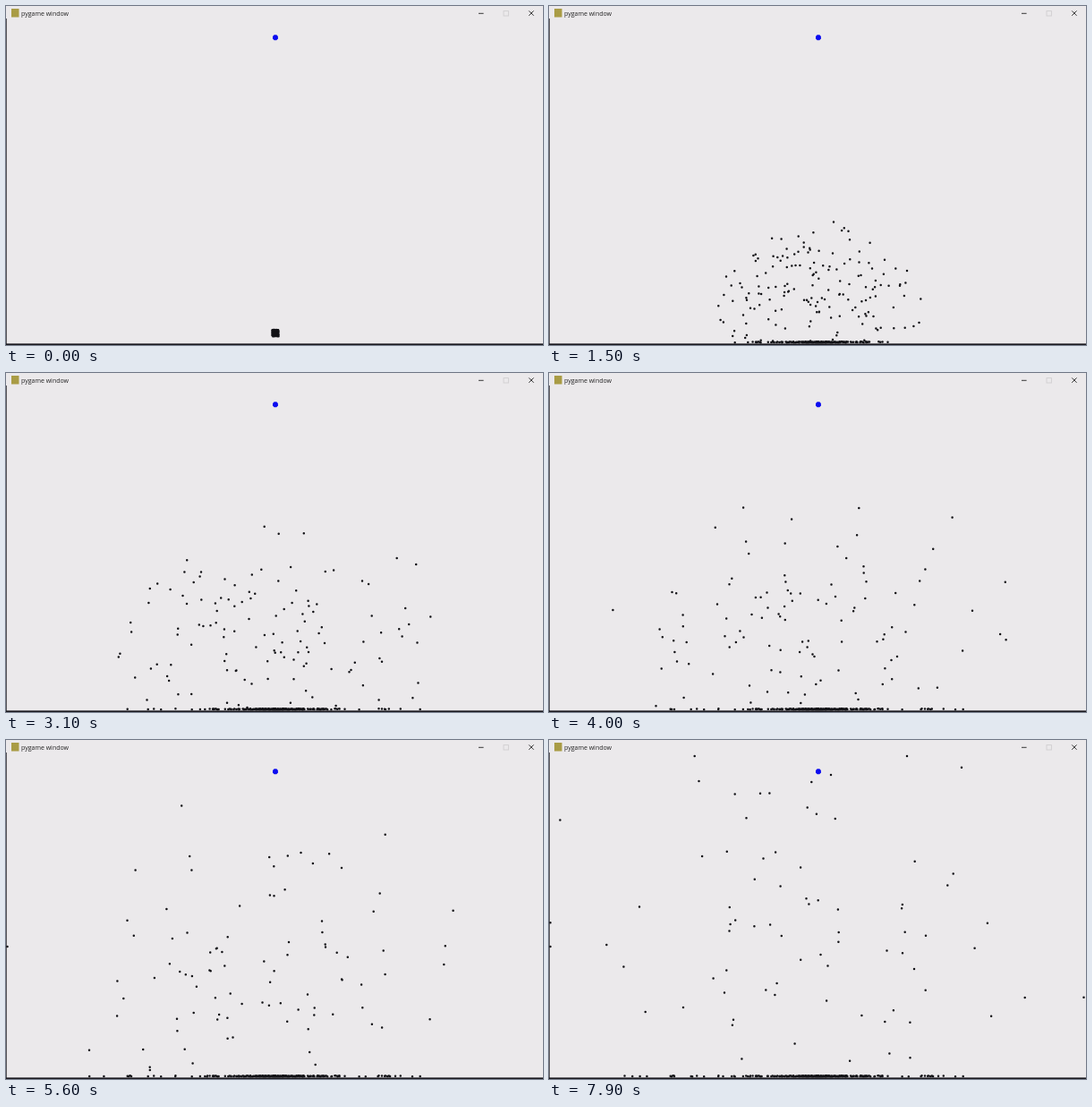
An HTML page for the animation above (8000 ms loop, 600 by 379 pixels).

```html
<!DOCTYPE html>
<html lang="en">
<head>
<meta charset="utf-8">
<title>pygame window</title>
<style>
  html, body { margin: 0; width: 100%; height: 100%; overflow: hidden; background: #ebe9eb; }
  svg { display: block; width: 100vw; height: 100vh; }
  text { font: 7px "Open Sans", "Noto Sans", sans-serif; fill: #222; }
</style>
</head>
<body>
<svg viewBox="0 0 600 379">
  <rect width="600" height="379" fill="#ebe9eb"/>
  <rect x="6" y="3" width="8.5" height="9.5" fill="#a99c45"/>
  <text x="17" y="10.6">pygame window</text>
  <g fill="none" stroke-width="0.9">
    <path d="M528 8.3h5.6" stroke="#222"/>
    <rect x="556" y="5.6" width="5.4" height="5.4" stroke="#d0ced0"/>
    <path d="M584.2 5.4l5.4 5.4m0-5.4l-5.4 5.4" stroke="#222"/>
  </g>
  <rect y="14" width="0.9" height="365" fill="#47464a"/>
  <rect y="377.4" width="600" height="1.6" fill="#19181e"/>
  <path d="M299.6 32.2h2.7l1.6 1.7v2.6l-1.6 1.7h-2.7l-1.6-1.7v-2.6z" fill="#0c0cf0"/>
  <path id="dots" fill="none" stroke="#121216" stroke-width="2.5" stroke-linecap="round"/>
</svg>
<script>
  const DOTS = 425, FRAMES = 80, FRAME_MS = 100;
  const SUBSTEPS = 4, SPEED = 92, TURN = 0.73;
  const FLOOR = 375.8, LEFT = 1.5, RIGHT = 598.5, TOP = 18;

  function seededRandom(seed) {
    return () => {
      seed = (seed + 0x6D2B79F5) | 0;
      let t = Math.imul(seed ^ (seed >>> 15), 1 | seed);
      t = (t + Math.imul(t ^ (t >>> 7), 61 | t)) ^ t;
      return ((t ^ (t >>> 14)) >>> 0) / 4294967296;
    };
  }

  const random = seededRandom(20);
  const spread = size => (random() * 2 - 1) * size;

  const swarm = Array.from({ length: DOTS }, () => ({
    x: 301 + spread(3.6),
    y: 365.7 + spread(3.6),
    angle: spread(Math.PI),
    floor: FLOOR + spread(0.5),
    alive: true
  }));

  // Each dot wanders at constant speed and sticks to any wall it meets.
  function advance(dot) {
    const step = SPEED * FRAME_MS / 1000 / SUBSTEPS;
    for (let i = 0; i < SUBSTEPS && dot.alive; i++) {
      dot.angle += spread(TURN);
      dot.x += step * Math.cos(dot.angle);
      dot.y += step * Math.sin(dot.angle);
      dot.alive = dot.x > LEFT && dot.x < RIGHT && dot.y > TOP && dot.y < dot.floor;
    }
    dot.x = Math.min(RIGHT, Math.max(LEFT, dot.x));
    dot.y = Math.min(dot.floor, Math.max(TOP, dot.y));
  }

  const outline = () =>
    swarm.map(d => `M${d.x.toFixed(1)} ${d.y.toFixed(1)}h.01`).join("");

  const poses = Array.from({ length: FRAMES }, (_, i) => {
    if (i) swarm.forEach(advance);
    return outline();
  });

  const path = document.getElementById("dots");
  let shown = -1;

  function draw() {
    const index = Math.floor(performance.now() / FRAME_MS) % FRAMES;
    if (index !== shown) path.setAttribute("d", poses[shown = index]);
    requestAnimationFrame(draw);
  }
  draw();
</script>
</body>
</html>
```
